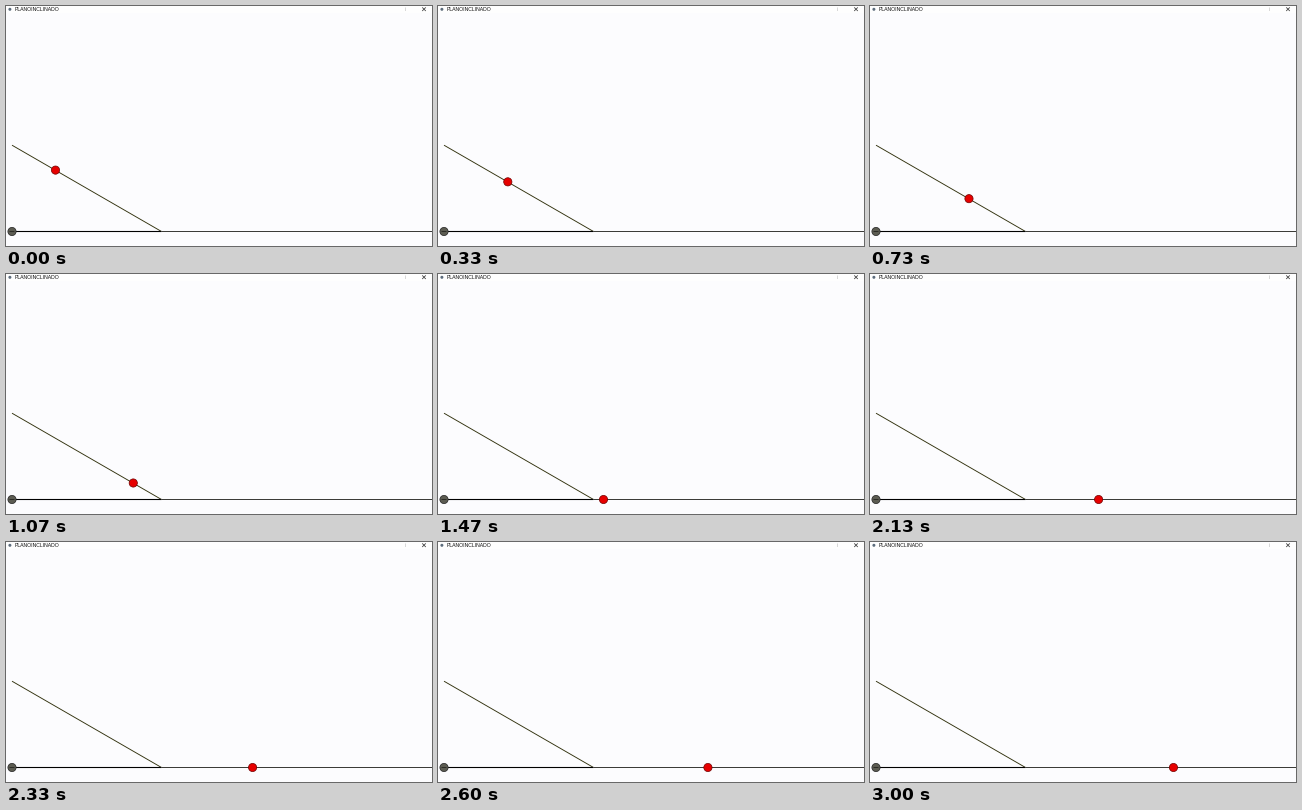
Recreate the animation shown at these times as a matplotlib script. Size 426 by 240 pixels, loop 3.07 s.

```python
import matplotlib.pyplot as plt
from matplotlib.animation import FuncAnimation
from matplotlib.patches import Circle, Rectangle

W, H, DPI = 426, 240, 100
PX = 72 / DPI            # points per pixel
TICK, TICKS = 10, 307    # ms per tick, ticks per loop

TOP, FOOT = (6, 139.2), (155.5, 225.5)
FLOOR = FOOT[1]
SLOPE = (FLOOR - TOP[1]) / (FOOT[0] - TOP[0])

fig = plt.figure(figsize=(W / DPI, H / DPI), dpi=DPI, facecolor="#fcfcfe")
ax = fig.add_axes([0, 0, 1, 1])
ax.set(xlim=(0, W), ylim=(H, 0))
ax.axis("off")


def line(x0, y0, x1, y1, color="black", width=1.0, z=2):
    ax.plot([x0, x1], [y0, y1], color=color, lw=width * PX,
            solid_capstyle="butt", snap=False, zorder=z)


def ball(x, y, r, fill, edge):
    return ax.add_patch(Circle((x, y), r, fc=fill, ec=edge, lw=0.7 * PX, zorder=4))


def draw_title_bar():
    ax.add_patch(Rectangle((0, 0), W, 7, color="#fefefe", lw=0))
    ax.add_patch(Circle((3.9, 3.3), 1.5, color="#5c6c7c", lw=0))
    ax.text(8.3, 5.1, "PLANOINCLINADO", fontsize=5.1 * PX,
            family="Liberation Sans", color="#101010", va="baseline")
    line(399.5, 1.5, 399.5, 5, "#d8d8d8")
    for d in (-1.8, 1.8):
        line(416.2, 3.2 - d, 419.8, 3.2 + d, "#404040", 0.8)


def position(step):
    """Speed up down the ramp, then slow down along the floor."""
    x = 49.5 + 3.70 * step + 0.0725 * step ** 2
    if x < FOOT[0]:
        return x, TOP[1] + SLOPE * (x - TOP[0]) - 0.2
    d = step - 22
    return 165.5 + 6.55 * d - 0.024 * d ** 2, FLOOR


draw_title_bar()
line(*TOP, *FOOT, color="#30300c", width=0.9)
line(6, FLOOR, FOOT[0], FLOOR, width=1.1)
line(FOOT[0], FLOOR, W, FLOOR, color="#3c3c38")
ball(6, FLOOR, 4.1, "#5c5c52", "#202020")
line(3.5, FLOOR, 8.5, FLOOR, "#2c2c26", z=5)
runner = ball(*position(0), 4.1, "#e60000", "#700000")


def update(tick):
    step = (3 * tick + 1) // 20   # 15 poses per second
    runner.center = position(step)
    return (runner,)


anim = FuncAnimation(fig, update, frames=TICKS, interval=TICK,
                     repeat=True, repeat_delay=0, blit=False)
plt.show()
```
